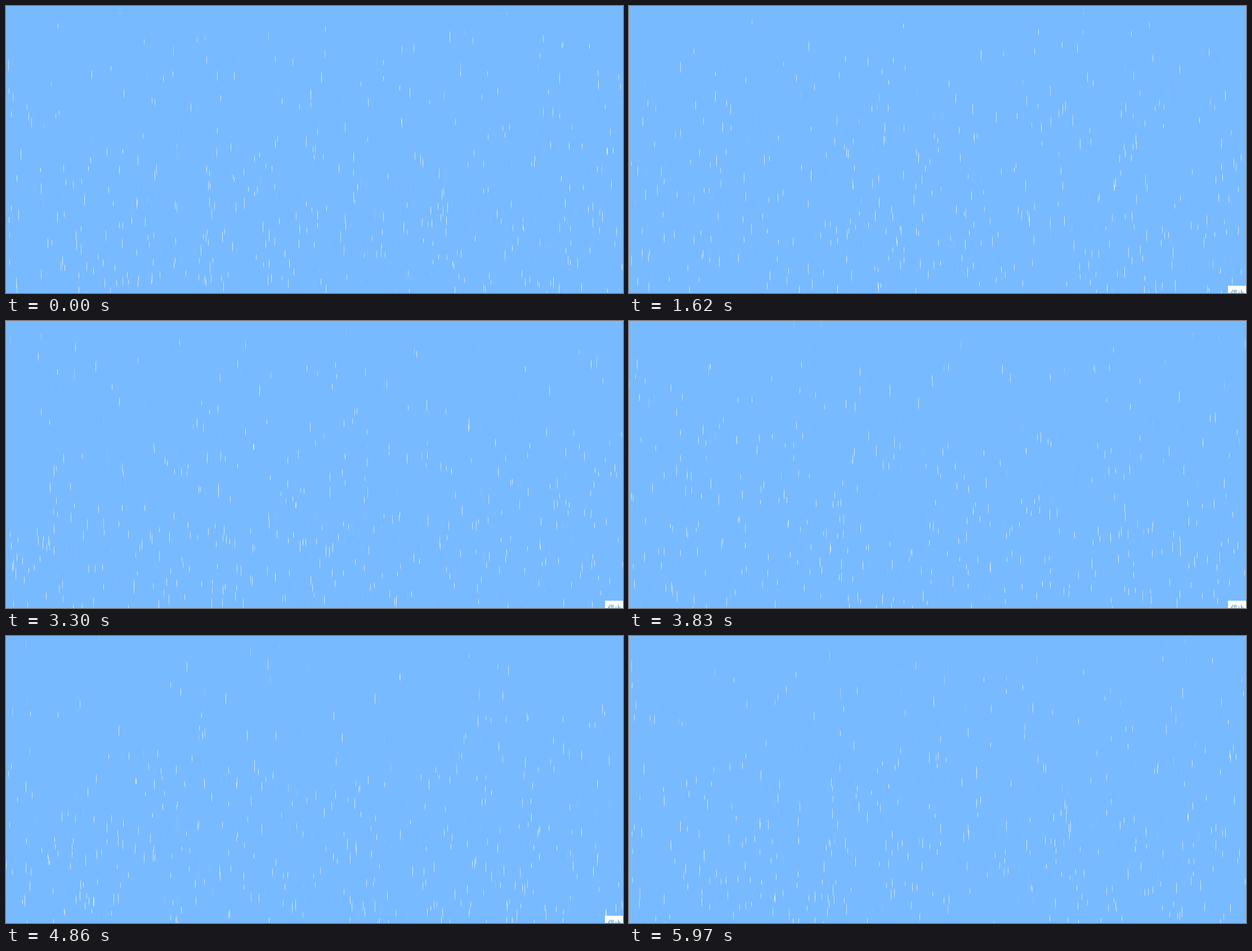
An HTML page with a canvas for the animation above (6040 ms loop, 1096x511 px).

```html
<!DOCTYPE html>
<html lang="zh">
<head>
<meta charset="utf-8">
<style>
html, body { margin: 0; width: 100%; height: 100%; overflow: hidden; background: #78baff; }
canvas { display: block; }
#stop {
  position: absolute; left: 1064px; top: 498px; width: 27px; height: 13px;
  padding-left: 5px; overflow: hidden; background: #fff; color: #3d94cf;
  font: 12px/26px "Noto Sans CJK SC", "Noto Sans CJK", sans-serif; white-space: nowrap;
}
</style>
</head>
<body>
<canvas id="rain" width="1096" height="511"></canvas>
<div id="stop">停止</div>
<script>
const W = 1096, H = 511, LOOP = 6040, STEPS = 77, COUNT = 500;
const ctx = document.getElementById('rain').getContext('2d');
const stop = document.getElementById('stop');

// Repeatable random number in 0..1 for a drop, its current fall and a property
function rand(drop, fall, key) {
  const v = Math.sin(drop * 12.9898 + fall * 78.233 + key * 37.719) * 43758.5453;
  return v - Math.floor(v);
}

function drawDrop(i, t) {
  const falls = 4 + Math.floor(rand(i, 0, 1) * 6);
  const pos = t * falls + rand(i, 0, 2);
  const fall = Math.floor(pos) % falls, p = pos % 1;
  const start = 0.8 * H * rand(i, fall, 3) ** 1.5 - 12;
  const x = Math.floor(rand(i, fall, 4) * W) + 0.5;
  const y = start + (H + 12 - start) * p;
  const half = 4.5 + 7 * rand(i, fall, 5) ** 1.5;
  const shade = rand(i, fall, 6);
  ctx.globalAlpha = Math.min(1, p * 10) * (shade < 0.25 ? 0.12 : 0.6 + 0.4 * shade);
  ctx.beginPath();
  ctx.ellipse(x, y, 0.4, half, 0, 0, Math.PI * 2);
  ctx.fill();
}

function frame(now) {
  const step = Math.floor((now % LOOP) / LOOP * STEPS);
  ctx.globalAlpha = 1;
  ctx.fillStyle = '#78baff';
  ctx.fillRect(0, 0, W, H);
  ctx.fillStyle = '#fff';
  for (let i = 0; i < COUNT; i++) drawDrop(i, step / STEPS);
  stop.hidden = step === 0 || step === STEPS - 1;
  requestAnimationFrame(frame);
}
requestAnimationFrame(frame);
</script>
</body>
</html>
```
